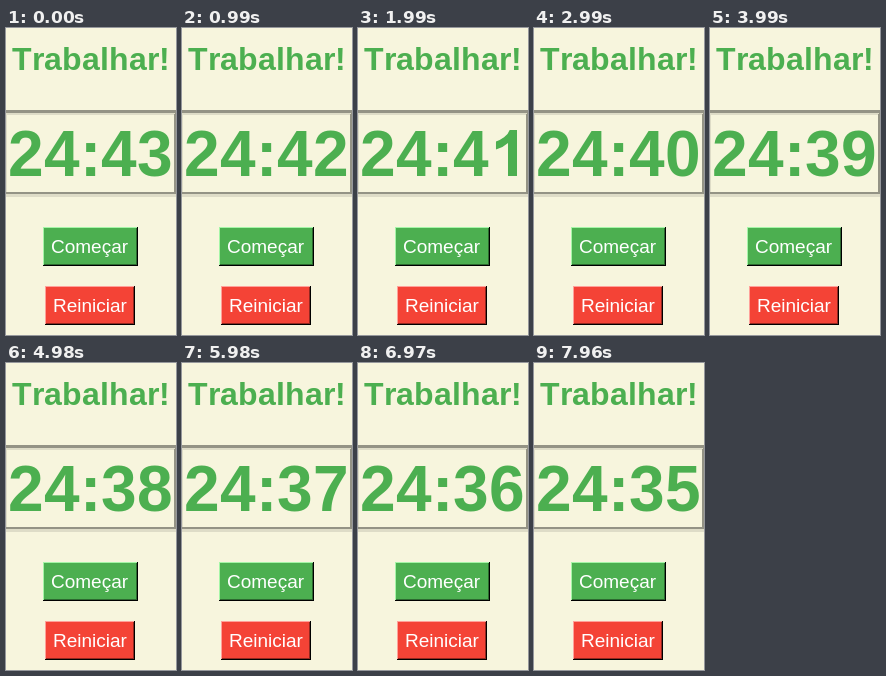
Animation, 170 px wide and 307 px high, one loop 8 s. Source, as an HTML page with a canvas:

```html
<!DOCTYPE html>
<html lang="pt">
<head>
<meta charset="utf-8">
<title>Trabalhar!</title>
<style>
html, body { margin: 0; width: 100%; height: 100%; overflow: hidden; background: #f7f5dd; }
canvas { display: block; }
</style>
</head>
<body>
<canvas id="stage" width="170" height="307"></canvas>
<script>
const ctx = document.getElementById('stage').getContext('2d');
const LOOP = 8000;
const START = 24 * 60 + 43;
const TICKS = [990, 1990, 2990, 3990, 4980, 5980, 6970, 7960];
const PAPER = '#f7f5dd', GREEN = '#4caf50', RED = '#f44336';
const SHADE = '#949385', LIGHT = '#dedcc7';
// The digit one without a foot, in units of the font size.
const ONE = new Path2D(
  'M.4375 0H.297V-.517Q.22-.446.109-.413V-.538Q.17-.556.235-.604T.323-.719H.4375Z');

function rect(color, x, y, w, h) {
  ctx.fillStyle = color;
  ctx.fillRect(x, y, w, h);
}

function setFont(size, color, weight = '') {
  ctx.font = `${weight} ${size}px "Liberation Sans", Arial, sans-serif`;
  ctx.fillStyle = color;
}

function drawOne(x, y, size) {
  ctx.save();
  ctx.translate(x, y);
  ctx.scale(size, size);
  ctx.fill(ONE);
  ctx.restore();
}

// Bold letters sit on whole-pixel advances, as in a hinted desktop label.
function label(text, x, y, size) {
  setFont(size, GREEN, 'bold');
  for (const ch of text) {
    if (ch === '1') drawOne(x, y, size);
    else ctx.fillText(ch, x, y);
    x += Math.round(ctx.measureText(ch).width);
  }
}

// Rings of one pixel, so the two tones meet on the diagonal.
function bevel(x, y, w, h, t, topLeft, bottomRight) {
  for (let i = 0; i < t; i++) {
    rect(bottomRight, x + i, y + i, w - 2 * i, h - 2 * i);
    rect(topLeft, x + i, y + i, w - 2 * i - 1, h - 2 * i - 1);
  }
}

function groove(x, y, w, h, outer, inner) {
  const t = outer + inner;
  bevel(x, y, w, h, outer, SHADE, LIGHT);
  bevel(x + outer, y + outer, w - 2 * outer, h - 2 * outer, inner, LIGHT, SHADE);
  rect(PAPER, x + t, y + t, w - 2 * t, h - 2 * t);
}

function button(x, y, w, h, face, light, dark, text) {
  bevel(x, y, w, h, 1, light, '#000');
  bevel(x + 1, y + 1, w - 2, h - 2, 1, face, dark);
  rect(face, x + 2, y + 2, w - 4, h - 4);
  setFont(19, '#fff');
  ctx.fillText(text, x + 8, y + 26);
}

function clock(ms) {
  const left = START - TICKS.filter(t => ms >= t).length;
  return Math.floor(left / 60) + ':' + String(left % 60).padStart(2, '0');
}

function draw(now) {
  rect(PAPER, 0, 0, 170, 307);
  label('Trabalhar!', 6, 42, 32);
  groove(-4, 82, 177, 87, 3, 2);
  label(clock(now % LOOP), 2, 148, 64);
  button(37, 199, 95, 39, GREEN, '#a5f5a7', '#2d6930', 'Começar');
  button(39, 258, 90, 39, RED, '#ffa19a', '#922820', 'Reiniciar');
  requestAnimationFrame(draw);
}
draw(performance.now());
</script>
</body>
</html>
```
